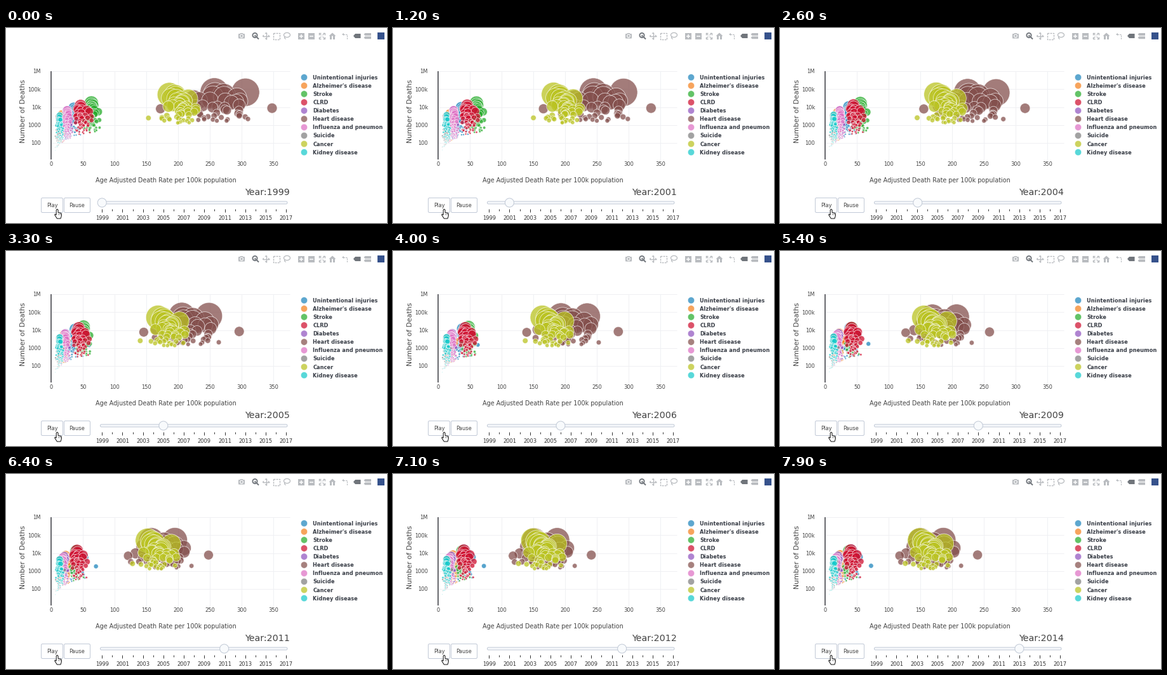
These frames come from a looping animation (600 px wide and 307 px high, 8 s). A matplotlib script:

```python
import numpy as np
import matplotlib.pyplot as plt
from matplotlib.animation import FuncAnimation
from matplotlib.patches import Circle, FancyBboxPatch, Polygon, Rectangle

W, H, DPI = 600, 307, 100
PX = 72 / DPI
INK, RAIL, GRID = "#444444", "#c2cad7", "#eff0f3"
STEP, LEAD = 532, 99  # ms per year, head start
STATES = 51

CAUSES = {  # colour, mean rate at the start and end, spread between states
    "Unintentional injuries": ("#1f86bd", 35, 40, .22),
    "Alzheimer's disease": ("#f5811f", 16, 23, .22),
    "Stroke": ("#27ac2c", 63, 37, .12),
    "CLRD": ("#cf0f2f", 46, 40, .2),
    "Diabetes": ("#9055c0", 24, 20, .16),
    "Heart disease": ("#84504d", 255, 164, .15),
    "Influenza and pneumon": ("#df70c4", 25, 17, .16),
    "Suicide": ("#7f7f7f", 11, 13, .25),
    "Cancer": ("#bac322", 200, 163, .075),
    "Kidney disease": ("#17cacb", 13, 13, .28),
}
COLORS = [c[0] for c in CAUSES.values()]
# Start and end rates of the largest states and the clear outliers, by size rank
KEY_RATES = {
    "Heart disease": {0: (257, 150), 1: (306, 186), 2: (258, 154), 3: (272, 170),
                      18: (172, 117), 27: (348, 240), 48: (310, 214)},
    "Cancer": {0: (186, 149), 1: (195, 155), 34: (153, 126)},
    "Unintentional injuries": {30: (48, 72)},
}


def build_rates():
    rng = np.random.default_rng(11)
    steady = 1 - np.exp(-rank / 6)  # large states stay near the mean
    rates = []
    for name, (_, first, last, spread) in CAUSES.items():
        level = 1 + spread * steady * np.clip(rng.normal(size=STATES), -1.9, 1.9)
        drift = 1 + .05 * steady * rng.normal(size=STATES)
        pairs = np.column_stack([first * level, last * level * drift])
        for i, pair in KEY_RATES.get(name, {}).items():
            pairs[i] = pair
        rates.append(pairs)
    return np.array(rates)


rank = np.arange(STATES)
POP = 27 * np.exp(-.2 * rank ** .75)  # age-weighted millions
RATES = build_rates()

fig = plt.figure(figsize=(W / DPI, H / DPI), dpi=DPI, facecolor="white")
ax = fig.add_axes([0, 0, 1, 1])
ax.set(xlim=(0, W), ylim=(H, 0))
ax.axis("off")


def text(x, y, s, size=8.4, color=INK, ha="center", **kw):
    return ax.text(x, y + .365 * size, s, size=size * PX, color=color, ha=ha,
                   va="baseline", family="DejaVu Sans", **kw)


def line(xs, ys, color=INK, width=1, z=1, **kw):
    ax.plot(xs, ys, color=color, lw=width * PX, zorder=z, solid_capstyle="butt", **kw)


def box(x, y, w, h, face, edge="none", radius=0, width=1, z=1):
    style = f"round,pad=0,rounding_size={radius}" if radius else "square,pad=0"
    ax.add_patch(FancyBboxPatch((x, y), w, h, boxstyle=style, fc=face, ec=edge,
                                lw=width * PX, zorder=z))


def shape(points, face, **kw):
    ax.add_patch(Polygon(points, fc=face, **kw))


def x_of(rate):
    return 71.5 + .9986 * rate


def y_of(deaths):
    return 68.3 + 28.15 * (6 - np.log10(deaths))


def draw_axes():
    for power, label in zip(range(6, 1, -1), ("1M", "100k", "10k", "1000", "100")):
        y = y_of(10 ** power)
        line([71, 447], [y, y], GRID)
        text(55, y, label, ha="right")
    for rate in range(0, 351, 50):
        if rate:
            line([x_of(rate)] * 2, [68, 207], GRID)
        text(x_of(rate), 213.5, str(rate))
    line([71, 71], [68, 207], "#696a6f", 2)
    text(251.5, 239.5, "Age Adjusted Death Rate per 100k population", 9.7)
    ax.text(27.5, 130.7, "Number of Deaths", size=10.9 * PX, color=INK, rotation=90,
            ha="center", va="center", family="DejaVu Sans")


def draw_legend():
    for i, (name, color) in enumerate(zip(CAUSES, COLORS)):
        y = 77.7 + 13.1 * i
        ax.add_patch(Circle((469.5, y), 5.2, fc=color, ec="white", lw=.5, alpha=.72))
        text(483.2, y, name, 8.3, "#3a3f48", "left", weight="bold")


def draw_controls():
    for x, w, label in ((55.5, 34, "Play"), (91.5, 41, "Pause")):
        box(x, 267.5, w, 23, "white", RAIL, 2)
        text(x + w / 2, 279, label)
    box(148.5, 273, 294.5, 4, "#f6f8fb", RAIL, 1.9)
    for i in range(19):
        x = slider_x(i)
        major = i % 2 == 0
        line([x, x], [285, 289.5 if major else 287.5], "#333333")
        if major:
            text(x, 299, str(1999 + i), 8.4, "#333333")
    hand = [(79.2, 286.4), (80.6, 285.2), (82, 286.4), (82.2, 290.6), (85.4, 291.2),
            (87, 291.8), (87.4, 295.5), (86, 300), (80.4, 300), (76.8, 294.4),
            (77.2, 293), (79.2, 294.2)]
    shape(hand, "white", ec="#111111", lw=PX, joinstyle="round", zorder=9)
    for x in (82.4, 84.2, 85.8):
        line([x, x], [291.5, 294], "#333333", .6, 10)


def draw_modebar():
    light, dark, y = "#b9bcc0", "#70757b", 12.5
    box(366, 9, 10, 7.5, light, radius=1)
    box(369, 7.5, 4, 2, light)
    ax.add_patch(Circle((371, y), 2.4, fc=light, ec="white", lw=.8))

    ax.add_patch(Circle((392, 11.5), 3.6, fc="none", ec=dark, lw=1.3))
    line([394.5, 398], [14, 17.5], dark, 2)
    line([390, 394], [11.5, 11.5], dark)
    line([392, 392], [9.5, 13.5], dark)

    for dx, dy in ((1, 0), (-1, 0), (0, 1), (0, -1)):
        center, out = np.array([409.5, y]), np.array([dx, dy])
        tip, side = center + 5.8 * out, 2 * out[::-1]
        line(*np.array([center, tip]).T, light, 1.4)
        shape([tip, tip - 2.4 * out + side, tip - 2.4 * out - side], light)

    ax.add_patch(Rectangle((421, 7.5), 10, 10, fc="none", ec=light, lw=1, ls=(0, (2, 1))))
    a = np.linspace(0, 2 * np.pi, 40)
    line(442.5 + 5 * np.cos(a), 11 + 3.6 * np.sin(a), light, 1.3)
    line([439, 438.5, 440.5], [13.5, 15.5, 17.5], light, 1.3)

    for x, plus in ((464.5, True), (481, False)):
        box(x - 5, 7.5, 10, 10, light)
        line([x - 3, x + 3], [y, y], "white", 1.5)
        if plus:
            line([x, x], [y - 3, y + 3], "white", 1.5)

    for sx in (-1, 1):
        for sy in (-1, 1):
            cx, cy = 497.5 + 4.5 * sx, y + 4.5 * sy
            line([cx - 3 * sx, cx, cx], [cy, cy, cy - 3 * sy], light, 1.4)
            line([497.5 + sx, cx], [y + sy, cy], light, 1.2)

    shape([(508.5, 12.5), (514, 7.5), (519.5, 12.5)], light)
    for x in (510, 515):
        box(x, 12.3, 3, 5.2, light)
    line([531, 537, 537], [10, 10, 18], light, 1.2, ls=(0, (2, 1)))
    shape([(529, 10), (532, 8), (532, 12)], light)

    shape([(547, 12.5), (550, 9), (558.5, 9), (558.5, 16), (550, 16)], dark)
    for top in (8, 13.2):
        shape([(563.5, top + 2), (565.5, top), (575, top), (575, top + 4), (565.5, top + 4)],
              light)
    box(585, 7, 11, 11, "#36528c")


def slider_x(year_index):
    return 151.2 + 16.11 * year_index


def ease_in_out(u, power):
    u = min(max(u, 0), 1)
    return .5 * (2 * u) ** power if u < .5 else 1 - .5 * (2 - 2 * u) ** power


def bubbles_at(years):
    progress = np.sin(np.pi / 2 * min(years / 14, 1) ** 1.3)
    rates = RATES[..., 0] + (RATES[..., 1] - RATES[..., 0]) * progress
    deaths = POP * 10 * rates * (1 + .022 * years)
    diameter = 45 * np.sqrt(deaths / 70000)
    points = np.column_stack([x_of(rates).ravel(), y_of(deaths).ravel()])
    return points, (diameter.ravel() * PX) ** 2


draw_axes()
draw_legend()
draw_controls()
draw_modebar()
start_points, start_sizes = bubbles_at(0)
bubbles = ax.scatter(*start_points.T, s=start_sizes, c=np.repeat(COLORS, STATES),
                     edgecolors="white", linewidths=.8 * PX, alpha=.75, zorder=4)
grip = ax.add_patch(Circle((slider_x(0), 275), 7, fc="#f8fafc", ec=RAIL, lw=PX, zorder=6))
year_label = text(447, 258, "", 14.3, ha="right")


def update(frame):
    year, since = divmod(frame * 100 + LEAD, STEP)
    points, sizes = bubbles_at(max(0, year - 1 + ease_in_out(since / 300, 2)))
    bubbles.set_offsets(points)
    bubbles.set_sizes(sizes)
    grip.center = slider_x(max(0, year - 1 + ease_in_out(since / 150, 3))), 275
    year_label.set_text(f"Year:{1999 + year}")
    return bubbles, grip, year_label


anim = FuncAnimation(fig, update, frames=80, interval=100, repeat=True, repeat_delay=0)
plt.show()
```
